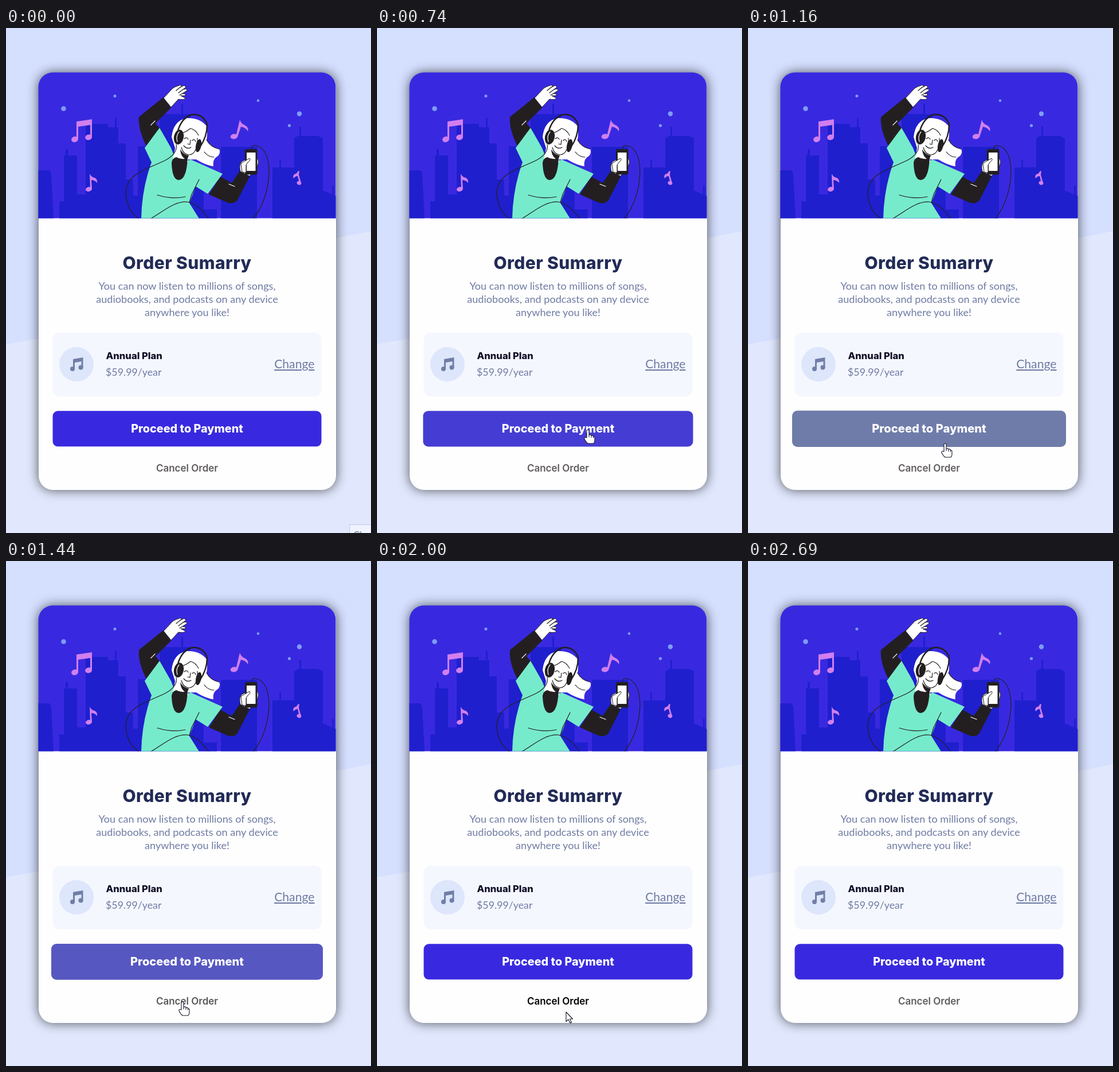
An HTML page that plays this animation: 637x880 px, repeating every 2760 ms.

```html
<!DOCTYPE html>
<html lang="en">
<head>
<meta charset="utf-8">
<title>Order summary</title>
<style>
  html, body { margin: 0; width: 100%; height: 100%; overflow: hidden; background: #d5dffe; }
  svg { position: absolute; left: 0; top: 0; }
  .card { position: absolute; left: 56.5px; top: 77.5px; width: 519px; height: 727px; border-radius: 25px;
    background: #fefefe; box-shadow: 0 0 20px rgba(0, 0, 0, .65); }
  text { font-family: Lato, sans-serif; fill: #6f7ba3; }
  .bold { font-family: Inter, sans-serif; font-weight: 800; }
  .mid { text-anchor: middle; }
  .ink { fill: #231f20; }
  .white { fill: #fff; }
  .teal { fill: #76ebcb; }
  .line { fill: none; stroke: #231f20; stroke-width: 1.2; stroke-linecap: round; stroke-linejoin: round; }
  .band { stroke-width: 2.4; }
  .edge { stroke: #231f20; stroke-width: 1; stroke-linejoin: round; }
  .fold { fill: none; stroke: #fff; stroke-width: 1.2; stroke-linecap: round; }
</style>
</head>
<body>
<svg width="637" height="880"><path d="M0 551L57 541L576 366L637 354V880H0z" fill="#e1e8fd"/></svg>
<div class="card"></div>
<svg width="637" height="880">
  <clipPath id="hero"><path d="M56.5 331.5V102.5a25 25 0 0 1 25-25H550.5a25 25 0 0 1 25 25V331.5z"/></clipPath>
  <g clip-path="url(#hero)">
    <path d="M56 77H576V332H56z" fill="#3829e0"/>
    <g fill="#1f1fce">
      <path d="M56 248H76L79 254L83 332H56z"/>
      <path d="M93 332V302H101V222H104V211H108V222H124V290H139V167H178V173H190V157H193V173H196V201H209V264H222V292H232V332z"/>
      <path d="M230 332V206H268V150H306V132H309V150H322V270H345V316H368V332z"/>
      <path d="M375 332V207H438V332z"/>
      <path d="M465 332V243H477V229H480V243H503V192L510 188H512V172H515V188H544L553 192V283L569 290V275H572V291L576 293V332z"/>
    </g>
    <g fill="#7f9cf6">
      <circle cx="100.5" cy="140.5" r="4.3"/><circle cx="190" cy="118.5" r="2.5"/>
      <circle cx="440" cy="126.5" r="2.2"/><circle cx="512" cy="149.5" r="4.2"/><circle cx="494.5" cy="170" r="2.6"/>
    </g>
    <g fill="#d17fee">
      <path d="M123 163L150 159V190H147V169L126 172V194H123z"/>
      <ellipse cx="120" cy="194" rx="6" ry="4.8" transform="rotate(-15 120 194)"/>
      <ellipse cx="144" cy="190.500" rx="6" ry="4.8" transform="rotate(-15 144 190)"/>
      <path d="M408 160Q410 167 418 170Q424 174 422 180Q418 173 410 172L404 190L401 189Z"/>
      <ellipse cx="398" cy="189" rx="6.3" ry="4.5" transform="rotate(-8 398 189)"/>
      <path d="M146 254Q149 260 155 261Q160 264 159 270Q155 265 149 265L150 281L147 281Z"/>
      <ellipse cx="144.500" cy="281" rx="5.5" ry="4" transform="rotate(-12 144 281)"/>
      <path d="M512 249L509 250Q508 254 503 255Q500 258 502 262Q505 258 509 258L512 270L515 270L511 256Z"/>
      <ellipse cx="511.500" cy="270" rx="4" ry="3.2" transform="rotate(20 511 270)"/>
    </g>

    <!-- raised arm -->
    <path class="ink" d="M274 121L288 139L261 166L272 179L245 206Q230 176 232 155Z"/>
    <path class="fold" d="M253 169L260 162"/>
    <path class="white edge" d="M275 122L291 105Q295 102 304 99.500L307 101L303 104L311 100L314 103L309 107L315 106L316 109L308 114L313 115L313 118L305 118Q309 120 313 122Q312 126 301 124L288 138Z"/>
    <path class="line" d="M303 104L297 109M309 107L301 113M308 114L303 117"/>

    <!-- phone arm -->
    <path class="ink" d="M354 290L386 304Q398 308 404 300L425 259L408 249L394 270L374 259Z"/>
    <path class="fold" d="M389 272L399 276"/>
    <path class="white edge" d="M409 250Q406 239 411 233L420 228L437 226Q442 230 440 237L437 246L425 258Z"/>
    <rect class="ink" x="417" y="211" width="21.5" height="44.5" rx="2"/>
    <path class="white" d="M420 217H435.500V249H420z"/>
    <path class="white edge" d="M410 236L425 227Q428 230 422 234L419 239V252L412 251Z"/>
    <path class="line" d="M428 211Q429 203 437 205C454 209 459 231 459 252Q457 300 431 333"/>

    <!-- hair, shirt, neck -->
    <path class="white" d="M289 190Q292 161 316 157Q338 156 350 171Q352 185 350 195Q357 208 372 211Q375 217 370 223Q360 228 362 241Q348 239 332 229L316 229L296 212Z"/>
    <path class="teal" d="M268 174L242 209L254 234Q237 280 236 332H337L320 305L331 276L352 289L378 254L322 229L300 240L288 209Z"/>
    <path class="white" d="M296 205H316L318 234H290Z"/>
    <path class="ink" d="M289 235Q290 227 297 225Q306 230 317 227Q315 265 301 265Q290 264 289 235Z"/>
    <path class="ink" d="M304 211Q309 221 319 222L316 230Q305 226 304 211Z"/>

    <!-- face and headphones -->
    <path class="white" d="M306 184Q318 172 331 180Q337 190 333 206Q329 221 319 221Q308 219 304 202Z"/>
    <path class="line" d="M334 192Q335 203 331 212Q327 221 319 221Q309 220 306 208M308 183Q316 180 322 175Q331 177 336 187"/>
    <path class="line" d="M311 193Q316 189 318 194M325 196Q329 192 331 198M322 195L321 203L317 202M310 205Q316 212 323 208M350 195Q357 208 372 211M346 216Q353 225 363 225"/>
    <path class="line band" d="M299 183Q305 157 324 151Q344 149 351 168Q351 190 338 208"/>
    <ellipse class="ink" cx="301.500" cy="190" rx="8.5" ry="13" transform="rotate(12 301 190)"/>
    <path class="fold" d="M302 181Q296 188 299 198"/>
    <ellipse class="ink" cx="336" cy="205" rx="4.7" ry="11.5" transform="rotate(12 336 205)"/>

    <!-- cable and creases -->
    <path class="line" d="M297 203Q300 218 279 230C245 247 209 253 209 289Q211 319 233 333M251 333C273 321 292 302 316 303Q337 307 354 333M264 291Q290 299 313 294M337 264L324 290L320 304"/>
  </g>

  <text class="bold mid" x="316" y="420" font-size="30" letter-spacing=".4" style="fill:#222b57">Order Sumarry</text>
  <g class="mid" font-size="18.1">
    <text x="316" y="456">You can now listen to millions of songs,</text>
    <text x="316" y="479">audiobooks, and podcasts on any device</text>
    <text x="316" y="502">anywhere you like!</text>
  </g>

  <rect x="81.5" y="531" width="469" height="111" rx="12" fill="#f5f7ff"/>
  <circle cx="123" cy="586" r="30" fill="#dde6fb"/>
  <g fill="#717fa6">
    <path d="M117 577L134.500 574V593H131.500V581L120 583V595H117z"/>
    <circle cx="116" cy="594" r="4"/><circle cx="130.5" cy="591.5" r="4"/>
  </g>
  <text class="bold" x="174.500" y="577" font-size="16.6" style="fill:#111027">Annual Plan</text>
  <text x="174" y="606" font-size="17.8">$59.99/year</text>
  <text x="538.500" y="593" font-size="21.2" text-anchor="end" text-decoration="underline">Change</text>

  <g id="pay">
    <rect x="81.5" y="667.3" width="469" height="62" rx="9"/>
    <text class="bold mid" x="316" y="705" font-size="19.8" style="fill:#fff">Proceed to Payment</text>
  </g>
  <text id="cancel" class="bold mid" x="316" y="772.500" font-size="17" style="font-weight:600">Cancel Order</text>

  <g id="tip">
    <path d="M599.500 890V865.500H650V890z" fill="#eff3fe" stroke="#c3c8dc"/>
    <text x="606" y="890" font-size="17">Close</text>
  </g>
  <g id="cursor" fill="#fff" stroke="#15152a" stroke-width="1.1" stroke-linejoin="round">
    <path id="arrow" d="M0 0V16.500L4 13L7 19L9.500 18L6.700 12H11.500Z"/>
    <path id="hand" d="M-3 14V2a2 2 0 0 1 4 0V9q3-1 4 1q3-.5 3.500 1.500q2.500 0 2.500 3v3.500q0 5-2.500 6H-1q-3-2-6-8q-.5-3 2-2.500zM1 9v4M5 10v4M8.500 11.500v3"/>
  </g>
</svg>
<script>
const LOOP = 2760, STEP = 70, FADE = 700;
const el = id => document.getElementById(id);
const show = (node, on) => node.style.display = on ? '' : 'none';
const pay = el('pay'), cancel = el('cancel'), cursor = el('cursor');

// pointer path: time, x, y
const path = [
  [250, 548, 868], [400, 462, 798], [530, 420, 760], [621, 388, 728], [740, 369, 700], [880, 364, 694],
  [1020, 358, 701], [1160, 345, 724], [1250, 335, 733], [1440, 309, 768], [1860, 311, 770],
  [2000, 330, 786], [2070, 362, 803], [2140, 408, 820], [2210, 472, 843], [2300, 540, 868]
];
const overPay = [621, 1248], overCancel = [1400, 1990];

const lerp = (a, b, p) => a + (b - a) * p;
const mix = (a, b, p) => `rgb(${a.map((v, i) => Math.round(lerp(v, b[i], p)))})`;
const bez = (a, b, u) => 3 * (1 - u) ** 2 * u * a + 3 * (1 - u) * u * u * b + u ** 3;
const inside = (t, [on, off]) => t >= on && t < off;

// CSS "ease" curve, solved by bisection
function ease(x) {
  if (x <= 0) return 0;
  if (x >= 1) return 1;
  let lo = 0, hi = 1;
  for (let i = 0; i < 20; i++) {
    const u = (lo + hi) / 2;
    if (bez(.25, .25, u) < x) lo = u; else hi = u;
  }
  return bez(.1, 1, lo);
}

const hover = (t, [on, off]) => Math.max(0, ease((t - on) / FADE) - ease((t - off) / FADE));

function moveCursor(t) {
  const i = path.findIndex(p => p[0] > t);
  show(cursor, i > 0);
  if (i < 1) return;
  const [t0, x0, y0] = path[i - 1], [t1, x1, y1] = path[i], p = (t - t0) / (t1 - t0);
  cursor.setAttribute('transform', `translate(${lerp(x0, x1, p)} ${lerp(y0, y1, p)})`);
  const hand = inside(t, overPay) || inside(t, overCancel);
  show(el('hand'), hand);
  show(el('arrow'), !hand);
}

function draw(now) {
  const time = now % LOOP;
  const t = 40 + Math.floor((time - 40) / STEP) * STEP;
  const p = hover(t, overPay);
  pay.setAttribute('transform', `translate(316 698.3) scale(${1 + .02 * p}) translate(-316 -698.3)`);
  pay.firstElementChild.style.fill = mix([56, 41, 224], [113, 127, 168], p);
  cancel.style.fill = mix([96, 92, 92], [0, 0, 0], hover(t, overCancel));
  show(el('tip'), time < 70);
  moveCursor(t);
  requestAnimationFrame(draw);
}
draw(0);
</script>
</body>
</html>
```
